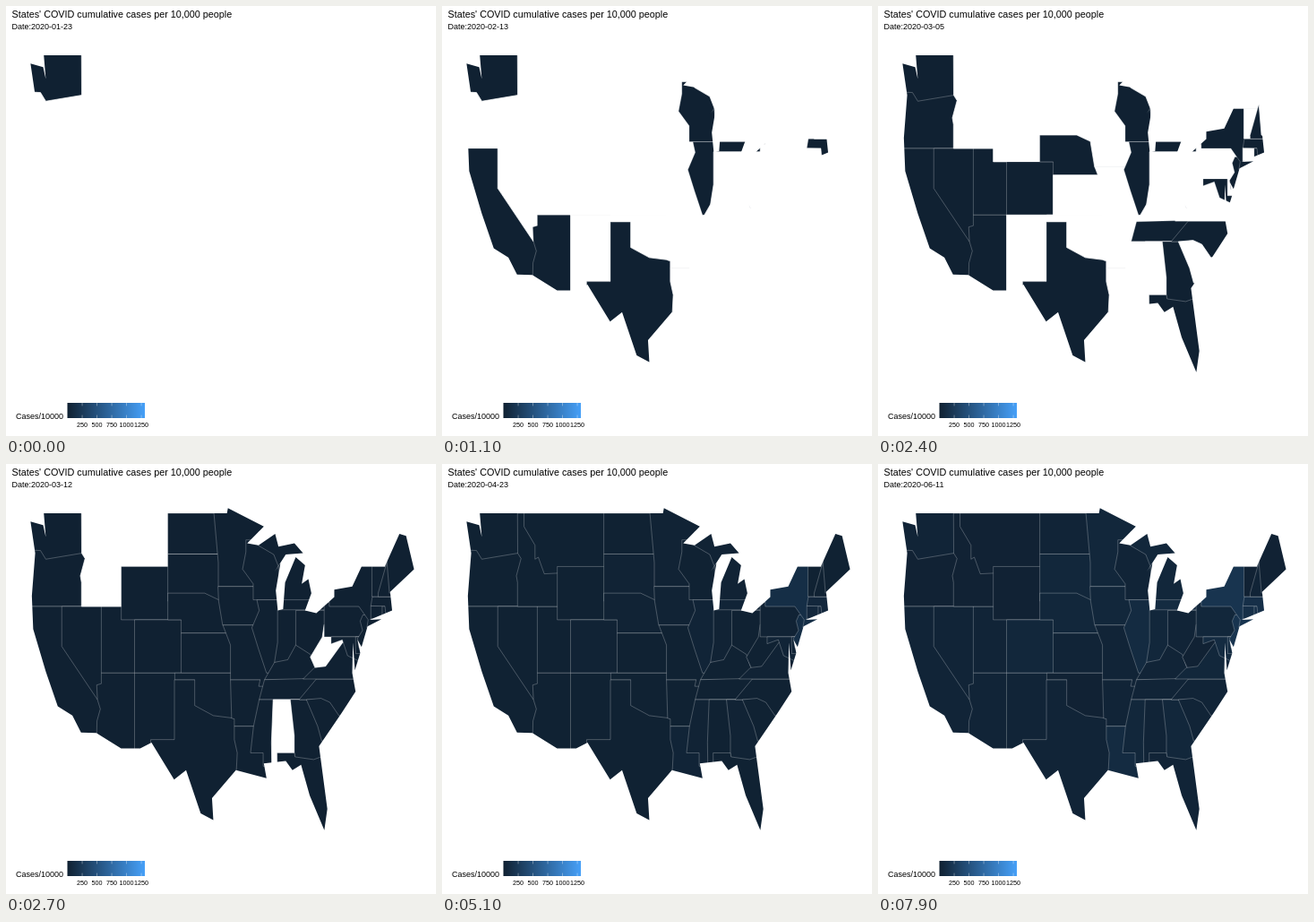
Recreate the animation shown at these times as an HTML page with a canvas. Size 480 by 480 pixels, loop 8000 ms.

```html
<!DOCTYPE html>
<html lang="en">
<head>
<meta charset="utf-8">
<title>Cumulative cases by state</title>
<style>
html, body { margin: 0; width: 100%; height: 100%; overflow: hidden; background: #fff; }
canvas, svg { position: absolute; left: 0; top: 0; width: 480px; height: 480px; }
text { font-family: "Liberation Sans", Arial, sans-serif; font-size: 9px; }
.title { font-size: 10.8px; }
.tick { font-size: 7.2px; text-anchor: middle; }
</style>
</head>
<body>
<canvas id="map" width="480" height="480"></canvas>
<svg viewBox="0 0 480 480">
  <text class="title" x="6.5" y="13">States' COVID cumulative cases per 10,000 people</text>
  <text id="date" x="6.5" y="26"></text>
  <text x="11" y="461">Cases/10000</text>
  <g id="ticks"></g>
</svg>
<script>
const SIZE = 480, LOOP = 8000, STEP = 100, STEPS_PER_WEEK = 4;
const LOW = [16, 33, 50], HIGH = [70, 160, 248], MAX_RATE = 1310;
const BAR = { x: 68.5, y: 443, w: 86.5, h: 17 };
const OCEAN_EAST = 66;

// States by the week of their first case; all others join in week 7.
const ARRIVALS = ["WA", "IL CA AZ", "WI MA", "TX", "NE", "UT",
  "OR NV CO TN GA FL NC NY NJ MD NH RI", "", "AL ID MT WV"];
// States with similar rates, then the rate in week 13 and in week 20.
const TIERS = [
  ["NY NJ", 130, 192],
  ["MA RI CT", 63, 145],
  ["IL LA DE MD", 35, 100],
  ["NE IA PA MI SD IN MS VA MN CO GA", 18, 60],
  ["WY ID ME VT WV OR MT OK", 7, 14]
];
const TYPICAL = ["", 9, 35];

const ctx = document.getElementById("map").getContext("2d");
const dateLabel = document.getElementById("date");
const states = [];

// Points are degrees west, degrees north.
function trace(path, degrees) {
  for (let i = 0; i < degrees.length; i += 2) {
    path.lineTo(143.5 + 7.42 * (109.05 - degrees[i]), 55 + 14.86 * (49 - degrees[i + 1]));
  }
  path.closePath();
  return path;
}

// A state reaches from its western border to the ocean; later states cover its east.
// A single last latitude runs the border straight south.
function state(name, ...border) {
  if (border.length % 2) border.splice(-1, 0, border.at(-3 + 1));
  const path = trace(new Path2D(), [OCEAN_EAST, border[1], ...border, OCEAN_EAST, border.at(-1)]);
  const week = ARRIVALS.findIndex(group => group.includes(name));
  const [, mid, end] = TIERS.find(tier => tier[0].includes(name)) || TYPICAL;
  states.push({ path, start: week < 0 ? 7 : week, mid, end });
}

function straightSouth(name, lon, north, south) {
  state(name, lon, north, lon, south);
}

straightSouth("WA", 125, 50, 45);
state("OR", 117, 46, 121.2, 45.65, 122.4, 45.55, 123.2, 46.2, 125, 46.25, 125, 42);
straightSouth("CA", 125, 42, 32);
state("NV", 120, 42, 120, 39, 114.63, 35);
straightSouth("UT", 114.05, 42, 37);
state("AZ", 114.05, 37, 114.05, 36.2, 114.74, 36.1, 114.63, 35, 114.2, 34.3, 114.7, 33.4, 114.8, 31);
state("ID", 117.03, 49, 117, 46, 116.5, 45.6, 117.2, 44.3, 117.03, 43.8, 117.03, 42);
state("MT", 116.05, 49, 116.05, 48, 114.4, 46.6, 114.4, 45.55, 113.9, 45.7, 113, 44.45, 111, 44.5);
straightSouth("WY", 111.05, 45, 41);
straightSouth("CO", 109.05, 41, 37);
straightSouth("NM", 109.05, 37, 31);
straightSouth("ND", 104.05, 49, 45.94);
straightSouth("SD", 104.05, 45.94, 42.4);
state("NE", 96.4, 42.5, 98.5, 43, 104.05, 43, 104.05, 41, 102.05, 41, 102.05, 40);
straightSouth("KS", 102.05, 40, 37);
state("TX", 103.05, 36.5, 103.05, 32, 106.62, 32, 106.62, 25);
state("OK", 103, 37, 103, 36.5, 100, 36.5, 100, 34.56, 97.2, 33.8, 94, 33.6);
state("MN", 97.2, 49.5, 96.45, 45.3, 96.45, 43.5);
state("IA", 96.5, 43.5, 96.4, 42.4, 95.8, 40.6);
state("AR", 94.62, 36.5, 94.45, 33.6, 94.04, 33.55, 94.04, 33);
state("MO", 95.77, 40.6, 94.62, 39.1, 94.62, 36.5, 90.15, 36.5, 90.37, 36);
state("LA", 94.04, 33, 94.04, 32, 93.6, 31, 93.8, 29);
state("WI", 92.3, 47, 92.3, 46.1, 92.8, 44.8, 91.2, 43.7, 91.2, 42.5);
state("MI", 90.4, 47.6, 90.4, 46.57, 88.1, 45.9, 87.4, 45, 87, 41.73);
state("IL", 90.65, 42.5, 90.3, 41.7, 91.4, 40.4, 90.4, 38.8, 89.2, 37);
state("IN", 87.53, 41.75, 87.53, 39.3, 88, 37.8);
straightSouth("OH", 84.8, 41.7, 38);
state("KY", 82, 37.5, 82.6, 38.4, 84.8, 39.1, 86, 38, 88, 37.8, 89.5, 36.5);
state("TN", 81.7, 36.6, 89.5, 36.5, 90.3, 35);
state("MS", 90.3, 35, 91.15, 33, 91.6, 31, 89.7, 31, 89.7, 30);
state("AL", 88.2, 35, 88.45, 31.8, 88.4, 30);
state("GA", 85.6, 35, 85, 32.3, 85, 30.3);
state("NC", 81.7, 36.55, 84.3, 35, 81, 35, 79, 33);
state("SC", 78.3, 33.8, 79.67, 34.8, 81, 35.1, 83.2, 35, 81.5, 33, 80.9, 31.9);
state("FL", 81, 30.7, 82.1, 30.5, 84.9, 30.7, 85, 31, 87.6, 31, 87.5, 25);
state("WV", 80.52, 40.64, 80.8, 39.7, 82.6, 38.2, 81.7, 37.2);
state("VA", 77.7, 39.3, 80.3, 37.5, 82, 37.4, 83.7, 36.55);
straightSouth("PA", 80.52, 42.3, 39.72);
state("MD", 79.48, 39.72, 79.48, 39.2, 77.8, 39.5, 77, 38.3, 75.5, 37.95);
straightSouth("DE", 75.79, 39.72, 38.46);
state("NJ", 74.7, 41.36, 75.1, 40.9, 74.75, 40.2, 75.5, 39.6, 75.3, 38.9);
state("NY", 79.8, 45.01, 79.76, 42, 75.3, 42, 73.9, 41, 74.1, 40.4);
straightSouth("CT", 73.5, 42.05, 41.08);
straightSouth("RI", 71.8, 42.02, 41.2);
state("MA", 73.27, 42.74, 73.5, 42.04, 71.38, 42.02, 71.2, 41.2);
straightSouth("VT", 73.34, 45.01, 42.74);
state("NH", 71.1, 45.3, 72.4, 43, 72.4, 42.73);
state("ME", 71.08, 47.6, 71.08, 45.3, 70.7, 43);

// Clockwise from the north-west corner.
const coast = [
  122.7, 49, 95.15, 49, 95, 49.38, 89.6, 48, 92.1, 46.75, 90.4, 46.6, 87.9, 47.45, 87.4, 46.5,
  85, 46.75, 83.7, 46, 86.3, 45.9, 88, 44.6, 87.1, 45.25, 87.8, 43.2, 87.5, 41.7, 86.7, 41.8,
  86.4, 43.8, 84.8, 45.7, 83.4, 45.1, 83.9, 43.7, 82.9, 44.05, 82.45, 43, 83.4, 41.7, 81.7, 41.5,
  79, 42.7, 79, 43.27, 76.3, 43.5, 74.9, 45, 71.4, 45, 69.2, 47.45, 68.2, 47.3, 67, 44.8,
  70.6, 43.1, 70.3, 41.7, 73.7, 41, 71.9, 41.05, 74, 40.5, 74.9, 38.95, 75.5, 39.5, 75.1, 38.5,
  75.9, 37.2, 76.2, 39.3, 76.3, 37, 75.8, 35.6, 77.9, 34, 81.3, 31.5, 80.05, 26.8, 80.5, 25.2,
  82.7, 27.8, 84, 30.1, 85.3, 29.7, 86.3, 30.4, 89.6, 30.2, 89.2, 29.1, 93.8, 29.7, 97.4, 27.6,
  97.2, 25.95, 99.1, 26.45, 101.3, 29.7, 103.1, 29, 106.5, 31.78, 108.2, 31.33, 111.07, 31.33,
  114.8, 32.5, 117.1, 32.53, 118.4, 33.8, 120.6, 34.5, 122.4, 37.1, 124.3, 40.3, 124.5, 42.8,
  124, 46, 124.7, 48.38, 122.8, 48.1, 122.4, 47.2
];
const water = new Path2D();
water.rect(0, 0, SIZE, SIZE);
water.addPath(trace(new Path2D(), coast));

const shade = rate =>
  `rgb(${LOW.map((c, i) => Math.round(c + (HIGH[i] - c) * rate / MAX_RATE))})`;

function rateAt({ mid, end }, week) {
  return week < 13
    ? mid * Math.max(0, (week - 8) / 5) ** 1.5
    : mid + (end - mid) * (week - 13) / 7;
}

const ticks = [1, 2, 3, 4, 5].map(i => ({ rate: i * 250, x: BAR.x + i * 16.5 }));

function drawLegend() {
  const gradient = ctx.createLinearGradient(BAR.x, 0, BAR.x + BAR.w, 0);
  gradient.addColorStop(0, shade(0));
  gradient.addColorStop(1, shade(MAX_RATE));
  ctx.fillStyle = gradient;
  ctx.fillRect(BAR.x, BAR.y, BAR.w, BAR.h);
  ctx.fillStyle = "rgba(255,255,255,.5)";
  for (const { x } of ticks) {
    for (const y of [BAR.y, BAR.y + BAR.h - 3.4]) ctx.fillRect(x - 0.3, y, 0.7, 3.4);
  }
}

function draw(step) {
  const progress = (step + 1) / STEPS_PER_WEEK, week = Math.floor(progress);
  ctx.lineWidth = 0.7;
  for (const item of states) {
    const visible = week >= item.start;
    ctx.fillStyle = visible ? shade(rateAt(item, progress)) : "#fff";
    ctx.strokeStyle = visible ? "rgba(255,255,255,.35)" : "#fff";
    ctx.fill(item.path);
    ctx.stroke(item.path);
  }
  ctx.fillStyle = "#fff";
  ctx.fill(water, "evenodd");
  drawLegend();
  const day = new Date(Date.UTC(2020, 0, 23 + 7 * week));
  dateLabel.textContent = "Date:" + day.toISOString().slice(0, 10);
}

for (const { rate, x } of ticks) {
  const label = document.createElementNS(dateLabel.namespaceURI, "text");
  label.setAttribute("class", "tick");
  label.setAttribute("x", x);
  label.setAttribute("y", 470);
  label.textContent = rate;
  document.getElementById("ticks").append(label);
}

const began = performance.now();
let shown = -1;
function tick() {
  const step = Math.floor((performance.now() - began) % LOOP / STEP);
  if (step !== shown) draw(shown = step);
  requestAnimationFrame(tick);
}
tick();
</script>
</body>
</html>
```
